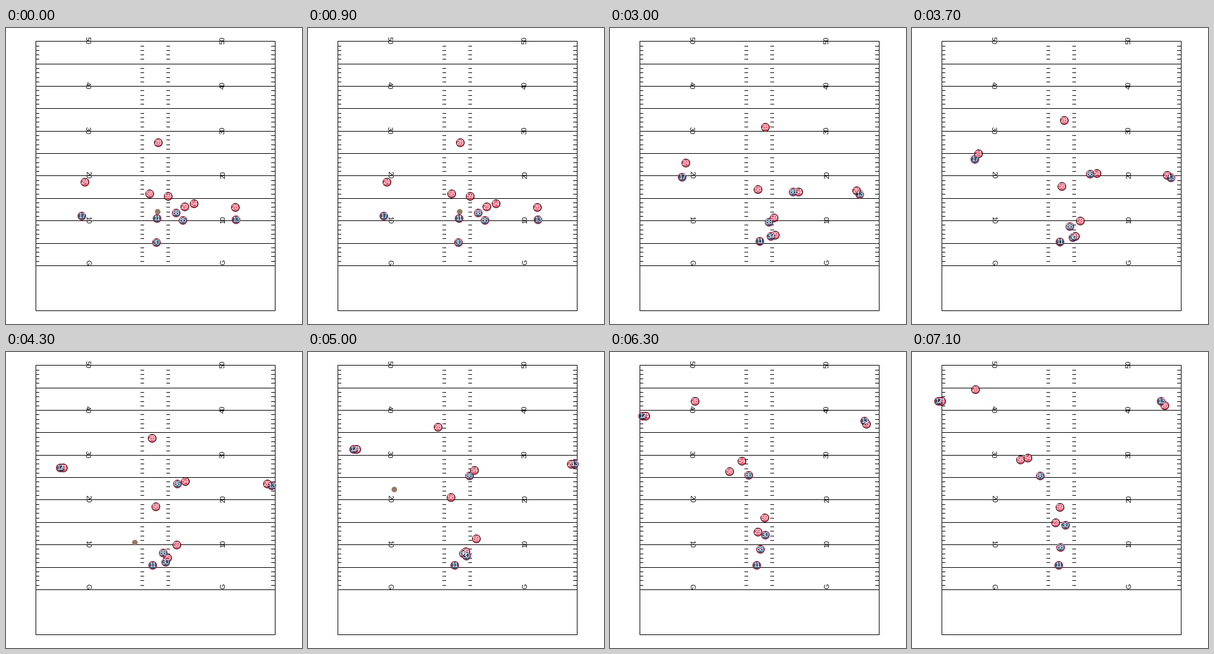
A matplotlib script for the animation above (7.2 s loop, 480x480 px).

```python
import numpy as np
import matplotlib.pyplot as plt
from matplotlib.animation import FuncAnimation
from matplotlib.collections import LineCollection
from matplotlib.patches import Circle

SIZE, FRAMES, INTERVAL = 480, 72, 100
LEFT, RIGHT, GOAL, BOTTOM = 48, 436, 384.87, 458
YARD = 7.27
FONT = "Liberation Sans"

# Play stages in frames: start of the routes, two breaks, the last frame
STAGES = (12, 30, 43, FRAMES - 1)
SNAP, THROW, CATCH = 10, 40, 58
STEPS = np.arange(FRAMES)


def route(*points):
    """Smooth path through one point per stage, slowing down at the end."""
    t = np.array(STAGES[:len(points)], float)
    p = np.array(points, float)
    m = np.gradient(p, t, axis=0)
    m[0] = 0
    m[-1] *= 0.6
    n = np.clip(STEPS, t[0], t[-1])
    k = np.clip(np.searchsorted(t, n, side="right") - 1, 0, len(t) - 2)
    h = (t[k + 1] - t[k])[:, None]
    s = (n - t[k])[:, None] / h
    return ((1 + 2 * s) * (1 - s) ** 2 * p[k] + s * (1 - s) ** 2 * h * m[k]
            + s * s * (3 - 2 * s) * p[k + 1] + s * s * (s - 1) * h * m[k + 1])


def throw_ball(passer, receiver):
    """Snap to the passer, straight flight, then carried by the receiver."""
    ball = passer + (0, 3)
    ball[:SNAP + 1] = (246, 298)
    flight = np.linspace(0, 1, CATCH - THROW + 1)[:, None]
    ball[THROW:CATCH + 1] = passer[THROW] * (1 - flight) + receiver[CATCH] * flight
    ball[CATCH:] = receiver[CATCH:]
    return ball


offense = {
    17: route((123, 305), (117, 242), (88, 188), (43, 80)),
    11: route((245, 309), (243, 346), (238, 346)),
    88: route((276, 300), (258, 315), (255, 326), (241, 317)),
    86: route((287, 312), (297, 266), (278, 214), (208, 201)),
    30: route((244, 348), (261, 338), (259, 341), (249, 281)),
    13: route((373, 311), (405, 270), (431, 217), (404, 80)),
}
# The two outside defenders shadow their receivers with a closing gap
defense = {
    28: route((247, 186), (252, 161), (237, 140), (103, 61)),
    24: offense[17] + route((5, -55), (6, -23), (5, 0)),
    58: route((233, 269), (240, 262), (243, 251), (176, 175)),
    59: route((263, 273), (266, 308), (277, 313), (240, 252)),
    29: route((290, 290), (268, 336), (262, 334), (233, 277)),
    54: route((305, 285), (306, 266), (291, 210), (188, 172)),
    26: offense[13] + route((-1, -20), (-5, -6), (-7, -3), (6, 7)),
}
ball_path = np.round(throw_ball(offense[11], offense[17]))


fig = plt.figure(figsize=(SIZE / 72, SIZE / 72), dpi=72, facecolor="white")
ax = fig.add_axes([0, 0, 1, 1])
ax.set_xlim(0, SIZE)
ax.set_ylim(SIZE, 0)
ax.axis("off")


def yard_y(yard):
    return round(GOAL - YARD * yard)


def draw_field():
    def across(x, y, width):
        return [(x, y + 0.5), (x + width, y + 0.5)]

    lines = [[(x + 0.5, yard_y(50)), (x + 0.5, BOTTOM + 1)] for x in (LEFT, RIGHT)]
    rows = [yard_y(n) for n in range(0, 51, 5)] + [BOTTOM]
    lines += [across(LEFT, y, RIGHT - LEFT + 1) for y in rows]
    lines += [across(x, yard_y(n), 6) for n in range(1, 50)
              for x in (LEFT, 218, 260, RIGHT - 6)]
    ax.add_collection(LineCollection(lines, colors="black", linewidths=1,
                                     capstyle="butt", snap=False, zorder=1))
    for n in range(0, 51, 10):
        y = yard_y(n) - (1 if n else 5)
        for x, angle in ((132, 270), (352, 90)):
            ax.text(x, y, str(n or "G"), rotation=angle, fontsize=11,
                    family=FONT, ha="center", va="center", zorder=2)


def add_team(team, fill, edge, zorder):
    players = []
    for number, path in team.items():
        dot = ax.add_patch(Circle((0, 0), 6.5, facecolor=fill, edgecolor=edge,
                                  linewidth=1, zorder=zorder))
        label = ax.text(0, 0, str(number), color="white", fontsize=11,
                        family=FONT, ha="center", va="center", zorder=6)
        players.append((dot, label, np.round(path)))
    return players


draw_field()
ball = ax.add_patch(Circle((0, 0), 4.5, facecolor="#937a64", linewidth=0, zorder=3))
players = add_team(defense, (0.89, 0.09, 0.22, 0.7), "#2a0c10", 4)
players += add_team(offense, (0.01, 0.17, 0.33, 0.76), "#b81f3c", 5)


def update(frame):
    ball.center = ball_path[frame]
    for dot, label, path in players:
        dot.center = path[frame]
        label.set_position(path[frame])
    return [ball]


anim = FuncAnimation(fig, update, frames=FRAMES, interval=INTERVAL,
                     repeat=True, repeat_delay=0, blit=False)
plt.show()
```
